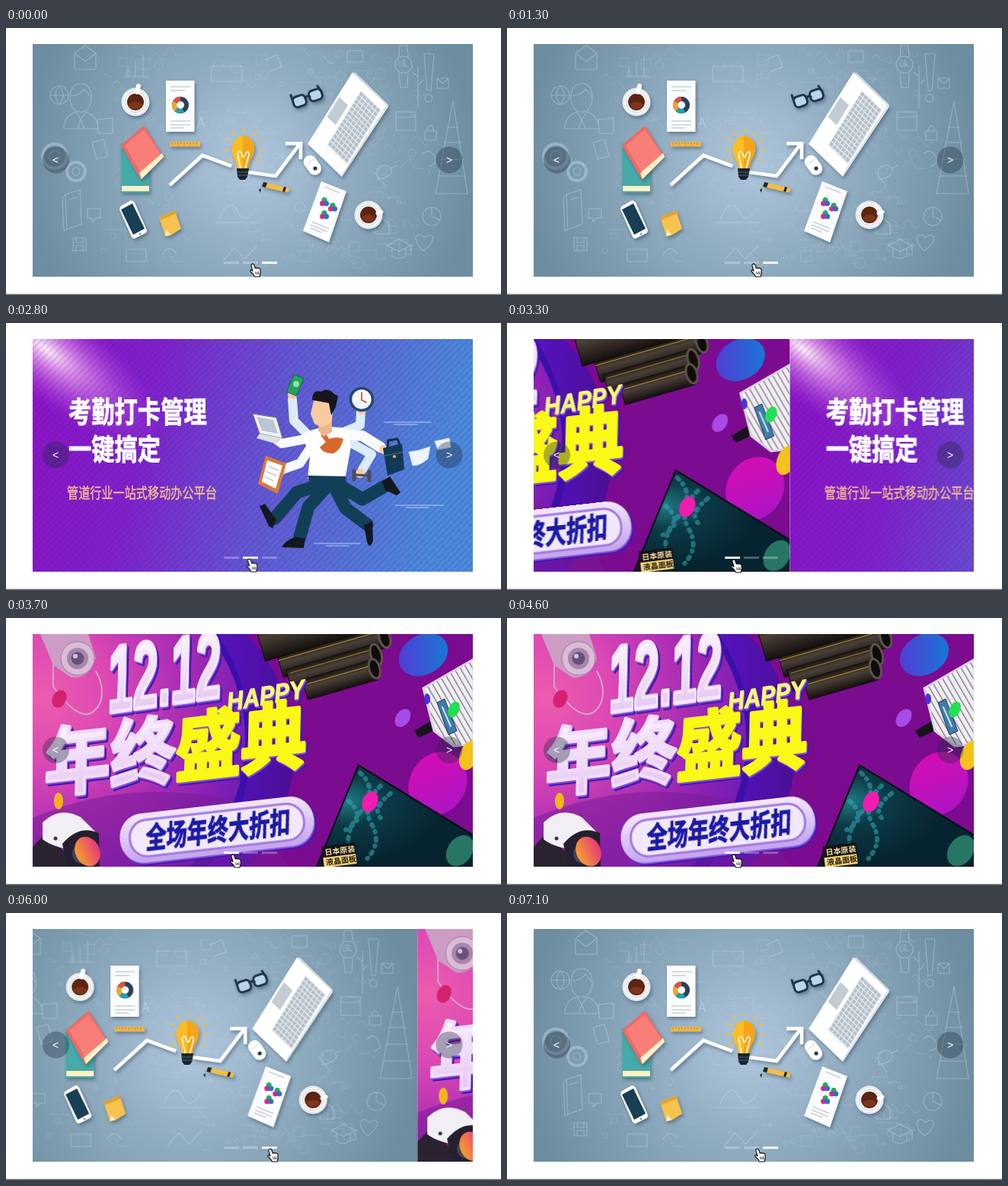
Write an HTML page that moves like this. It is 650 px wide and 350 px high and loops after 7200 ms.

```html
<!DOCTYPE html>
<html lang="zh">
<head>
<meta charset="utf-8">
<title>Carousel</title>
<style>
html, body { margin: 0; width: 100%; height: 100%; overflow: hidden; background: #fff; }
svg { display: block; }
text { font-family: "Noto Sans CJK SC", "Noto Sans CJK", sans-serif; }
.latin { font-family: "Liberation Sans", sans-serif; font-weight: 700; font-style: italic; }
.heavy { font-weight: 900; }
.line { fill: none; stroke-linecap: round; stroke-linejoin: round; }
.shade { filter: drop-shadow(2px 3px 2px rgba(30, 50, 70, .4)); }
.raised { filter: drop-shadow(1px 2px 0 #8a4fd8) drop-shadow(2px 2px 0 #3f1bb0); }

.slide, .dot, #hand { animation: 7.2s linear infinite; }
.slide { animation-timing-function: ease-in-out; clip-path: url(#view); }
#sale { animation-name: sale; }
#office { animation-name: office; }
#desk { animation-name: desk; }
@keyframes sale {
  0%, 42.8% { transform: translateX(-578px); }
  48.36%, 79.16% { transform: none; }
  84.72%, 100% { transform: translateX(578px); }
}
@keyframes office {
  0%, 18.61% { transform: translateX(-578px); }
  24.17%, 42.8% { transform: none; }
  48.36%, 100% { transform: translateX(578px); }
}
@keyframes desk {
  0%, 18.61% { transform: none; }
  24.17%, 60% { transform: translateX(578px); }
  60.01%, 79.16% { transform: translateX(-578px); }
  84.72%, 100% { transform: none; }
}

.dot { fill: #fff; opacity: .3; animation-timing-function: step-end; }
#dot1 { animation-name: dot1; }
#dot2 { animation-name: dot2; }
#dot3 { animation-name: dot3; }
@keyframes dot1 { 0%, 79.1%, 100% { opacity: .3; } 42.8% { opacity: 1; } }
@keyframes dot2 { 0%, 42.8%, 100% { opacity: .3; } 18.61% { opacity: 1; } }
@keyframes dot3 { 0%, 79.1%, 100% { opacity: 1; } 18.61% { opacity: .3; } }

#hand { animation-name: hand; }
@keyframes hand {
  0%, 18.5% { transform: translate(320px, 308px); }
  20%, 38% { transform: translate(321px, 308px); }
  42.5%, 75% { transform: translate(294px, 309px); }
  78.7%, 93% { transform: translate(343px, 308px); }
  97.5%, 98.6% { transform: translate(325px, 308px); }
  100% { transform: translate(320px, 308px); }
}
</style>
</head>
<body>
<svg width="650" height="350" viewBox="0 0 650 350">
<defs>
  <clipPath id="view"><rect x="35" y="21" width="578" height="304.5"/></clipPath>
  <radialGradient id="slate" gradientUnits="userSpaceOnUse" cx="320" cy="175" r="300">
    <stop offset="0" stop-color="#afc6dd"/><stop offset=".45" stop-color="#8fabc0"/><stop offset="1" stop-color="#6d8da0"/>
  </radialGradient>
  <linearGradient id="night" x2="1" y2=".12">
    <stop offset="0" stop-color="#8d12c6"/><stop offset=".3" stop-color="#7f22cb"/>
    <stop offset=".6" stop-color="#6259d2"/><stop offset="1" stop-color="#4b8ada"/>
  </linearGradient>
  <radialGradient id="glow">
    <stop offset="0" stop-color="#fff0fb"/><stop offset=".3" stop-color="#eaa0ee" stop-opacity=".75"/>
    <stop offset="1" stop-color="#b03ce0" stop-opacity="0"/>
  </radialGradient>
  <radialGradient id="pink" gradientUnits="userSpaceOnUse" cx="50" cy="105" r="300">
    <stop offset="0" stop-color="#ec5cae"/><stop offset=".3" stop-color="#db48b4"/>
    <stop offset=".62" stop-color="#a82cb4"/><stop offset="1" stop-color="#6b18b4"/>
  </radialGradient>
  <linearGradient id="violet" x2="1"><stop offset=".75" stop-color="#5a12c8"/><stop offset="1" stop-color="#4a0f96"/></linearGradient>
  <linearGradient id="pipe" x2="0" y2="1">
    <stop offset="0" stop-color="#1d1712"/><stop offset=".4" stop-color="#4a4038"/><stop offset="1" stop-color="#15100e"/>
  </linearGradient>
  <linearGradient id="orb" x2="1" y2="1"><stop offset="0" stop-color="#dc0cb0"/><stop offset="1" stop-color="#a416c8"/></linearGradient>
  <linearGradient id="azure" x2="1" y2=".4"><stop offset="0" stop-color="#5a35d4"/><stop offset="1" stop-color="#1d72d6"/></linearGradient>
  <linearGradient id="ember" x2="1"><stop offset="0" stop-color="#f6a02c"/><stop offset="1" stop-color="#e8367e"/></linearGradient>
  <radialGradient id="deep" cx=".2" cy=".35" r=".6">
    <stop offset="0" stop-color="#1f7a84"/><stop offset=".4" stop-color="#0c3a46"/><stop offset="1" stop-color="#062430"/>
  </radialGradient>
  <linearGradient id="pearl" x2="0" y2="1"><stop offset="0" stop-color="#fff"/><stop offset="1" stop-color="#e2bdf2"/></linearGradient>
  <linearGradient id="rim" x2="0" y2="1"><stop offset="0" stop-color="#f4e8fc"/><stop offset="1" stop-color="#c3a4ec"/></linearGradient>
  <pattern id="hatch" width="6" height="6" patternUnits="userSpaceOnUse" patternTransform="rotate(45)">
    <rect width="2" height="6" fill="#30106a" opacity=".13"/>
  </pattern>
  <pattern id="ribs" width="7" height="7" patternUnits="userSpaceOnUse" patternTransform="rotate(-30)">
    <rect width="7" height="7" fill="#f1eef3"/><rect width="1.3" height="7" fill="#77727e"/>
  </pattern>
  <g id="cup">
    <circle r="18.5" fill="#f4f6f8"/><circle r="17" fill="none" stroke="#d5dde4"/>
    <circle r="13.5" fill="#fff" stroke="#c8d2da"/><circle r="11" fill="#5c2413"/>
    <path d="M-9 3A9.5 9.5 0 0 0 9 3Q0-4-9 3Z" fill="#7e3519"/>
  </g>
  <g id="venn"><circle cy="-2.6" r="3.5" fill="#1fae5a"/><circle cx="-2.5" cy="2" r="3.5" fill="#d92a86"/><circle cx="2.6" cy="2" r="3.5" fill="#2f6fc4"/></g>
</defs>

<g clip-path="url(#view)">

<g id="sale" class="slide">
  <rect x="35" y="21" width="578" height="305" fill="#7b0b8f"/>
  <ellipse cx="140" cy="175" rx="238" ry="230" fill="url(#violet)"/>
  <ellipse cx="105" cy="165" rx="216" ry="240" fill="#3a10a8"/>
  <ellipse cx="90" cy="160" rx="224" ry="225" fill="url(#pink)"/>
  <path d="M35 262Q180 200 335 250L370 326H35Z" fill="#7a1c98" opacity=".55"/>
  <g transform="rotate(-16 430 60)">
    <g fill="url(#pipe)" stroke="#0f0b0a"><rect x="362" y="29" width="140" height="30"/><rect x="368" y="50" width="118" height="29"/><rect x="385" y="69" width="95" height="27"/><rect x="345" y="-20" width="150" height="52"/></g>
    <path class="line" d="M362 36H494M372 56H480M385 76H474" stroke="#b8912f"/>
    <g fill="#100c0c" stroke="#5c534a" stroke-width="3"><ellipse cx="504" cy="46" rx="7" ry="13"/><ellipse cx="487" cy="64" rx="7" ry="14"/><ellipse cx="480" cy="81" rx="7" ry="13"/></g>
  </g>
  <g>
    <path class="line" d="M62 20V90Q105 150 124 110Q130 90 118 70" stroke="#dba0cc" stroke-width="2"/>
    <path d="M45 21H108L118 52Q110 80 86 78L62 62Z" fill="#cc9cc4"/>
    <circle cx="94" cy="53" r="22" fill="#dbbcd6" stroke="#a07aa4"/><circle cx="94" cy="53" r="14" fill="#a984ac"/>
    <circle cx="94" cy="53" r="8.5" fill="#6a5078"/><circle cx="91" cy="50" r="3" fill="#d7c3e2"/>
  </g>
  <ellipse cx="70" cy="106" rx="9" ry="12" fill="#d4226e" transform="rotate(25 70 106)"/>
  <ellipse cx="69" cy="240" rx="6" ry="11" fill="#f0b51f"/>
  <g>
    <path d="M35 300L52 282L96 326H35Z" fill="#2b2232"/>
    <path d="M48 268Q70 246 98 261L118 281L88 304Q60 300 48 290Z" fill="#f1eff3"/>
    <path d="M74 296Q96 270 122 282L123 326H80Z" fill="#252030"/>
    <circle cx="100" cy="309" r="13" fill="#45425a"/><circle cx="65" cy="289" r="2.5" fill="#3b3944"/>
  </g>
  <ellipse cx="107" cy="306" rx="16" ry="20" fill="url(#ember)" transform="rotate(-25 107 306)"/>
  <ellipse cx="548" cy="48" rx="34" ry="26" fill="url(#azure)" transform="rotate(-30 548 48)"/>
  <g>
    <path d="M536 148L566 130L574 142L542 157Z" fill="#17131c"/>
    <path d="M548 92L614 54V165L588 168L562 148Z" fill="url(#ribs)" stroke="#d8d3de" stroke-width="3"/>
    <path d="M566 111L576 106L592 148L581 153Z" fill="#3f7cae" stroke="#234"/>
    <path class="line" d="M573 117L584 142" stroke="#c7e4ef" stroke-width="2"/>
  </g>
  <ellipse cx="588" cy="120" rx="7" ry="11" fill="#22e052" transform="rotate(25 588 120)"/>
  <ellipse cx="553" cy="106" rx="4" ry="7" fill="#4932d8"/>
  <ellipse cx="521" cy="131" rx="9" ry="13" fill="#a64be6" transform="rotate(35 521 131)"/>
  <ellipse cx="567" cy="217" rx="37" ry="43" fill="url(#orb)" transform="rotate(30 567 217)"/>
  <ellipse cx="608" cy="180" rx="12" ry="20" fill="#f4c21c" transform="rotate(20 608 180)"/>
  <path d="M463 193L614 285V326H408Z" fill="url(#deep)" stroke="#0b0a10" stroke-width="2"/>
  <path class="line" d="M465 203Q490 225 465 255T455 315M492 220Q465 245 480 270T472 318M450 240Q478 266 440 280M505 230Q480 250 492 262" stroke="#35a8b4" stroke-width="6" stroke-dasharray="3 7 1 8" opacity=".55"/>
  <ellipse cx="596" cy="305" rx="16" ry="22" fill="#3fae86" transform="rotate(35 596 305)" opacity=".6"/>
  <ellipse cx="478" cy="241" rx="10" ry="14" fill="#f01bb0" transform="rotate(25 478 241)"/>
  <g transform="translate(419 311) rotate(-7)" font-size="10" class="heavy">
    <path d="M-3-12H41V17H-8Z" fill="#16121a"/>
    <text fill="#f5e6a0">日本原装</text><rect x="-3" y="3" width="43" height="13" fill="#f0d678"/><text y="13" fill="#2a1c10">液晶面板</text>
  </g>
  <g class="raised" stroke-linejoin="round">
    <text class="latin" transform="translate(136 124) rotate(-8) skewX(-4) scale(1 2.05)" font-size="60" fill="url(#pearl)" stroke="#f6e6fb" stroke-width="2.6">12.12</text>
    <text class="latin" transform="translate(291 122) rotate(-10) skewX(-5) scale(1 1.12)" font-size="30" fill="#f8f57c" stroke="#f8f57c">HAPPY</text>
    <text class="heavy" transform="translate(50 227) rotate(-6.5) skewX(-8) scale(1 1.12)" font-size="86.5" fill="url(#pearl)" stroke="#f1dcf8" stroke-width="4">年终<tspan fill="#f9f816" stroke="#f9f816">盛典</tspan></text>
  </g>
  <g transform="translate(277 278) rotate(-6.5)">
    <g class="raised"><rect x="-128" y="-33" width="256" height="65" rx="31" fill="url(#rim)"/></g>
    <rect x="-115" y="-24" width="230" height="48" rx="23" fill="#f1e8fb" stroke="#a278e0" stroke-width="3"/>
    <text class="heavy" transform="translate(-96 14) skewX(-8) scale(1 1.42)" font-size="27.3" fill="#1c1aa4" stroke="#1c1aa4" stroke-width=".8">全场年终大折扣</text>
  </g>
</g>

<g id="office" class="slide">
  <rect x="35" y="21" width="578" height="305" fill="url(#night)"/>
  <ellipse cx="52" cy="34" rx="190" ry="62" fill="url(#glow)" transform="rotate(38 52 34)"/>
  <rect x="35" y="21" width="578" height="305" fill="url(#hatch)"/>
  <g class="heavy" font-size="30.3" fill="#fff" stroke="#fff" stroke-width=".7">
    <text transform="translate(82 130) scale(1 1.25)">考勤打卡管理</text>
    <text transform="translate(82 179) scale(1 1.25)">一键搞定</text>
  </g>
  <text transform="translate(80 230) scale(1 1.3)" font-size="15.15" font-weight="500" fill="#f5c08e" stroke="#f5c08e" stroke-width=".3">管道行业一站式移动办公平台</text>
  <g class="line" stroke="#cfe2fb" opacity=".8"><path d="M497 130H558M510 133H540M511 239H574M525 242H555M405 289H465M420 292H450" stroke-width="1.2"/></g>
  <g class="line" stroke="#dcebf8" stroke-width="12">
    <path d="M398 148L378 128L376 100M438 145L465 134L466 116M440 150L480 172L468 192"/>
  </g>
  <g class="line" stroke="#123f58" stroke-width="17">
    <path d="M425 208L382 222L353 256M425 210L397 241L386 280M428 208L446 243L474 264M430 208L468 231L499 213"/>
  </g>
  <g fill="#15171f">
    <path d="M333 240L340 237L355 258L350 269L345 266Z"/><path d="M362 294Q366 286 380 280L393 283L391 295Z"/>
    <path d="M470 265L481 260L482 285Q478 298 474 287Z"/><path d="M494 208L504 201L518 222L513 226L498 219Z"/>
  </g>
  <path class="line" d="M394 152L362 158L350 149M400 163L386 184L360 193" stroke="#f7faff" stroke-width="12"/>
  <path class="line" d="M445 146L468 148L492 163" stroke="#f7faff" stroke-width="14"/>
  <path d="M389 146Q412 132 448 138L453 162L445 206L396 204L399 176Z" fill="#fff"/>
  <path d="M396 200L446 201L448 216L402 218Z" fill="#123f58"/>
  <path d="M413 147L420 145L424 152Q435 148 443 152Q440 166 430 171Q418 172 412 163L420 156Z" fill="#d8672b"/>
  <path d="M411 125H428V143L417 149L410 141Z" fill="#eeb58d"/>
  <path d="M404 102Q414 96 430 104L428 128Q418 141 405 132L400 119Z" fill="#f8caa2"/>
  <path d="M402 101Q402 86 414 90Q422 84 431 93L436 96L433 110L427 121L424 105L408 102Z" fill="#17151c"/>
  <g fill="#f8caa2"><circle cx="376" cy="94" r="6"/><circle cx="354" cy="151" r="6"/><circle cx="360" cy="195" r="6"/><circle cx="467" cy="114" r="6"/><circle cx="465" cy="197" r="6"/><circle cx="496" cy="166" r="6"/></g>
  <rect x="373" y="69" width="14" height="25" rx="2" fill="#25a35c" stroke="#126a45" transform="rotate(24 380 81)"/><circle cx="381" cy="80" r="4" fill="#8fe0a7"/>
  <circle cx="467" cy="100" r="14.5" fill="#f5f7fa" stroke="#234a68" stroke-width="3.5"/><path class="line" d="M467 91V101L473 104" stroke="#d4502c" stroke-width="1.7"/>
  <path d="M324 119L355 124L363 151L333 145Z" fill="#f1f2f5" stroke="#737b8b"/><path d="M329 123L351 127L357 145L336 141Z" fill="#b9c6d4"/><path d="M333 145L363 151L350 157L329 151Z" fill="#d9dfe7"/>
  <path d="M341 174L368 184L357 224L331 211Z" fill="#d87a3b"/><path d="M343 180L363 187L354 217L336 208Z" fill="#fff"/><path class="line" d="M345 188L357 193M343 195L355 200M341 202L351 207" stroke="#9aabb9"/>
  <g class="line" stroke="#4c4d5a"><path d="M458 199L476 200" stroke-width="3"/><path d="M457 194V205M477 195V206" stroke-width="5"/></g>
  <path class="line" d="M501 163L502 154L514 152L517 160" stroke="#112f49" stroke-width="3"/>
  <path d="M495 164L520 158L523 192L501 200Z" fill="#123954"/><path d="M497 174L522 169" stroke="#4d7590"/><circle cx="510" cy="175" r="2" fill="#e7b853"/>
  <g fill="#eef4fd" stroke="#c7d8ef"><path d="M529 169Q542 168 557 162L554 178Q544 187 534 187Z"/><path d="M563 155L582 151L584 163L567 166Z"/></g>
</g>

<g id="desk" class="slide">
  <rect x="35" y="21" width="578" height="305" fill="url(#slate)"/>
  <path id="scrawl" class="line" stroke="#d6e5ef" stroke-width=".8" opacity=".22"/>
  <g class="line" stroke="#d4e3ec" stroke-width="1.1" opacity=".38">
    <path d="M90 33L104 23L118 33V54H90ZM90 33L104 44L118 33"/>
    <path d="M84 93Q84 73 98 73T112 93Q110 110 98 110T84 93M86 89Q98 88 103 80L111 90M76 132Q76 115 92 110L98 120L105 110Q120 115 121 132ZM98 120L94 132M98 120L103 132"/>
    <circle cx="70" cy="88" r="12"/><path d="M58 88H82M70 76Q60 88 70 100Q80 88 70 76"/>
    <g stroke-dasharray="5 3" stroke-width="4"><circle cx="64" cy="168" r="16"/><circle cx="92" cy="188" r="12"/></g><circle cx="64" cy="168" r="7"/><circle cx="92" cy="188" r="5"/>
    <path d="M78 218L97 212L99 257L80 264ZM78 218L74 223L76 266L80 264M83 225L93 222M107 237H124V249H118L113 254V249H107Z"/>
    <path d="M88 275H105V292H88ZM92 275V281H101V275M92 292V285H101V292M113 150L128 146L134 168L119 172ZM120 120L140 118V138H121Z"/>
    <circle cx="522" cy="48" r="11"/><path d="M516 38L517 23H527L528 38M516 59L518 78H527L528 59M522 42V48L527 50M512 110H538V134H512ZM512 117H538"/>
    <path d="M549 34H562L558 82H553Z"/><circle cx="555" cy="92" r="5"/><path d="M541 105V50M541 64L534 58M541 75L548 68M566 66H581V79H566ZM566 66L574 73L581 66"/>
    <path d="M587 96L564 217H606ZM580 130H594M576 150H598M572 172H601M568 194H604M550 135H565V147H550ZM553 135Q557 120 562 135"/>
    <path d="M487 185Q498 175 505 184T488 199ZM505 184L513 180M484 189L499 208M547 165Q555 157 562 167T556 181M556 187V189"/>
    <circle cx="559" cy="247" r="12"/><path d="M559 247V235M559 247L570 252M538 274Q544 267 549 275Q557 268 561 275Q559 285 548 292Q538 284 538 274"/>
    <path d="M482 257L492 247L503 257V270H485V257M500 285L516 277L532 285L516 293ZM507 290V300Q516 304 525 299V290M532 285V298"/>
    <path d="M280 250Q294 220 304 240T329 236M275 255H333M285 305L300 288L313 303L329 286M158 290H184V306H158ZM205 297Q214 282 224 296"/>
    <path d="M160 50V64M170 44V64M180 36V64M155 64H188M270 50H310V70H270ZM340 42L356 35L362 51L346 57M448 30H468V45H448Z"/>
  </g>
  <text x="251" y="130" font-size="17" fill="#d9e7f0" opacity=".4">A</text>

  <g class="shade"><use href="#cup" x="170" y="97"/><path class="line" d="M172 84L174 76" stroke="#fff" stroke-width="6"/></g>
  <g class="shade"><rect x="210" y="69" width="37.5" height="67" fill="#fbfcfd"/></g>
  <path d="M216 77H242M216 82H235M216 122H242M216 127H242M216 131H234" stroke="#c8d2da" stroke-width="1.7"/>
  <g fill="none" stroke-width="6" transform="rotate(-90 229 101)">
    <circle cx="229" cy="101" r="8" pathLength="100" stroke="#294157"/>
    <circle cx="229" cy="101" r="8" pathLength="100" stroke="#20a0b4" stroke-dasharray="20 80" stroke-dashoffset="-42"/>
    <circle cx="229" cy="101" r="8" pathLength="100" stroke="#f1a62e" stroke-dasharray="21 79" stroke-dashoffset="-62"/>
    <circle cx="229" cy="101" r="8" pathLength="100" stroke="#dd5140" stroke-dasharray="17 83" stroke-dashoffset="-83"/>
  </g>
  <g class="shade"><rect x="215" y="149" width="40" height="6.5" fill="#efb548"/></g><path d="M218 150V153M222 150V152M226 150V153M230 150V152M234 150V153M238 150V152M242 150V153M246 150V152M250 150V153" stroke="#a8762b" stroke-width=".8"/>
  <g class="shade"><path d="M151 151L188 160V216H151Z" fill="#46aaa9"/><path d="M152 207H188V214H152Z" fill="#fff1c6"/></g>
  <g class="shade"><path d="M151 154L181 128L207 169L177 199Z" fill="#ed6a67"/><path d="M156 154L181 133L203 165L177 190Z" fill="#f77f78"/><path d="M175 190L205 164L207 169L178 198Z" fill="#fff1c6"/></g>
  <g class="shade"><path class="line" d="M215 206L258 167L296 181M318 189L354 194L385 153M367 151.5H387V172" stroke="#fff" stroke-width="4.6" style="stroke-linejoin:miter;stroke-linecap:butt"/></g>
  <path class="line" d="M312 136V132M300 140L297 135M325 140L328 135M294 148L289 145M331 148L336 145M292 160H287M333 160H338M295 171L290 174M330 171L335 174" stroke="#f0bd3c" stroke-width="1.8"/>
  <g class="shade"><path d="M304 185Q303 177 299 170Q293 158 300 148Q305 141 311 141Q323 142 326 154Q327 164 321 173Q318 178 318 185Z" fill="#fbbd25"/></g>
  <path d="M311 141Q323 142 326 154Q327 164 321 173Q318 178 318 185H311Z" fill="#f4a51a"/>
  <path class="line" d="M308 184L304 165Q307 158 310 166Q312 173 314 166Q318 158 319 166L314 184" stroke="#fff8dc" stroke-width="1.7"/>
  <path d="M303 184H319L317 195L314 199H307L304 195Z" fill="#17242f"/><path d="M303 189H318M304 193H317" stroke="#51636f"/>
  <g class="shade"><path d="M338 202L372 210L371 216L336 208Z" fill="#f4bd43"/></g><path d="M338 202L343 203L341 209L336 208ZM365 208L368 209L366 215L363 214ZM332 212L335 210L334 216Z" fill="#1d2730"/>
  <g class="shade" fill="#b9d5ec" stroke="#22344b" stroke-width="3">
    <rect x="377" y="89" width="17" height="14" rx="5" transform="rotate(-18 385 96)"/><rect x="398" y="81" width="17" height="14" rx="5" transform="rotate(-18 406 88)"/>
    <path class="line" d="M393 92Q395 88 399 90M376 94L374 88M413 82L409 76"/>
  </g>
  <g class="shade"><path d="M455 58L502 103L441 195L396 152Z" fill="#fff"/></g>
  <path class="line" d="M458 59L501 101L442 192" stroke="#d5dfe6" stroke-width="2"/>
  <g transform="matrix(.47 .45 -.58 .93 455 58)">
    <rect x="4" y="33" width="24" height="28" fill="#c4ccd3"/><rect x="35" y="9" width="56" height="77" fill="#e4e9ed"/>
    <g id="keys" fill="#b6c0c8"/>
  </g>
  <g class="shade"><rect x="394" y="166" width="17" height="28" rx="8.5" fill="#fff" transform="rotate(-36 402 180)"/></g><circle cx="406" cy="184" r="2.6" fill="#27384a"/><path d="M396 178L405 171" stroke="#cbd5dd"/>
  <g class="shade"><path d="M414 201L447 214L424 281L390 266Z" fill="#fbfcfd"/></g>
  <path d="M418 208L438 216M402 254L424 263M400 258L422 267M399 262L414 268" stroke="#c8d2da" stroke-width="1.4"/>
  <use href="#venn" x="418" y="228"/><use href="#venn" x="429" y="235"/><use href="#venn" x="418" y="245"/>
  <g class="shade"><use href="#cup" x="476" y="245"/><path class="line" d="M488 243L493 241" stroke="#fff" stroke-width="5"/></g>
  <g class="shade"><path d="M150 234L164 226Q167 226 169 229L185 265Q185 268 183 269L169 276Q166 276 165 274L149 238Z" fill="#fff"/></g>
  <path d="M151 238L166 230L182 263L167 271Z" fill="#173f55"/><circle cx="176" cy="270" r="1.4" fill="#8796a0"/>
  <g class="shade"><path d="M201 248L222 239L230 263L216 272L209 273Z" fill="#f7c24d"/></g><path d="M201 248L222 239L224 243L202 252Z" fill="#e0a333"/><path d="M209 273L211 264L216 271Z" fill="#fff0b8"/>
</g>

<g fill="#1f2d3d" fill-opacity=".36"><circle cx="65.5" cy="173" r="17.5"/><circle cx="582" cy="173" r="17.5"/></g>
<g fill="#fff" font-size="14" text-anchor="middle"><text x="65" y="178" style="font-family:'Liberation Sans',sans-serif">&lt;</text><text x="582" y="178" style="font-family:'Liberation Sans',sans-serif">&gt;</text></g>
<rect id="dot1" class="dot" x="286" y="306.3" width="20" height="2.8"/>
<rect id="dot2" class="dot" x="311" y="306.3" width="20" height="2.8"/>
<rect id="dot3" class="dot" x="336" y="306.3" width="20" height="2.8"/>
</g>

<rect y="348.7" width="650" height="1.3" fill="#686868"/>
<g id="hand"><path d="M2.5 1.5Q4.5 .2 5.7 2.5L7.3 7Q8.8 5.8 9.8 7Q11 5.9 12 7.2Q13.8 6.6 14 9L14.3 13L13 18H6.5L4.5 14.5L.8 11Q.6 8.8 2.7 9.5L4 10.5L2 4Q1.6 2.2 2.5 1.5Z" fill="#fff" stroke="#111" stroke-width="1.2" stroke-linejoin="round"/><path d="M7.6 11.5L8.3 15M9.8 11.3L10.2 15M11.9 11.2V15" stroke="#111" stroke-width=".8"/></g>
</svg>
<script>
const $ = id => document.getElementById(id);
let seed = 7;
const rand = (lo, hi) => {
  seed = (seed * 16807) % 2147483647;
  return Math.round(lo + (hi - lo) * seed / 2147483647);
};

// Faint chalk marks across the board
const marks = [
  s => `h${s}v${s}h${-s}z`,
  s => `a${s / 2} ${s / 2} 0 1 0 ${s} 0a${s / 2} ${s / 2} 0 1 0 ${-s} 0`,
  s => `l${s} ${-s}l${s / 2} ${s}h${s}`,
  s => `q${s / 2} ${-s} ${s} 0t${s} 0`,
  s => `h${s * 2}v${s}h${s}m-4-3l4 3l-4 3`
];
let chalk = '';
for (let i = 0; i < 170; i++) {
  chalk += `M${rand(125, 535)} ${rand(26, 315)}` + marks[rand(0, 4)](rand(5, 15));
}
$('scrawl').setAttribute('d', chalk);

let keys = '';
for (let row = 0; row < 6; row++) {
  for (let col = 0; col < 14; col++) {
    keys += `<rect x="${36 + row * 9.1}" y="${10 + col * 5.4}" width="7.3" height="4"/>`;
  }
}
$('keys').innerHTML = keys;
</script>
</body>
</html>
```
